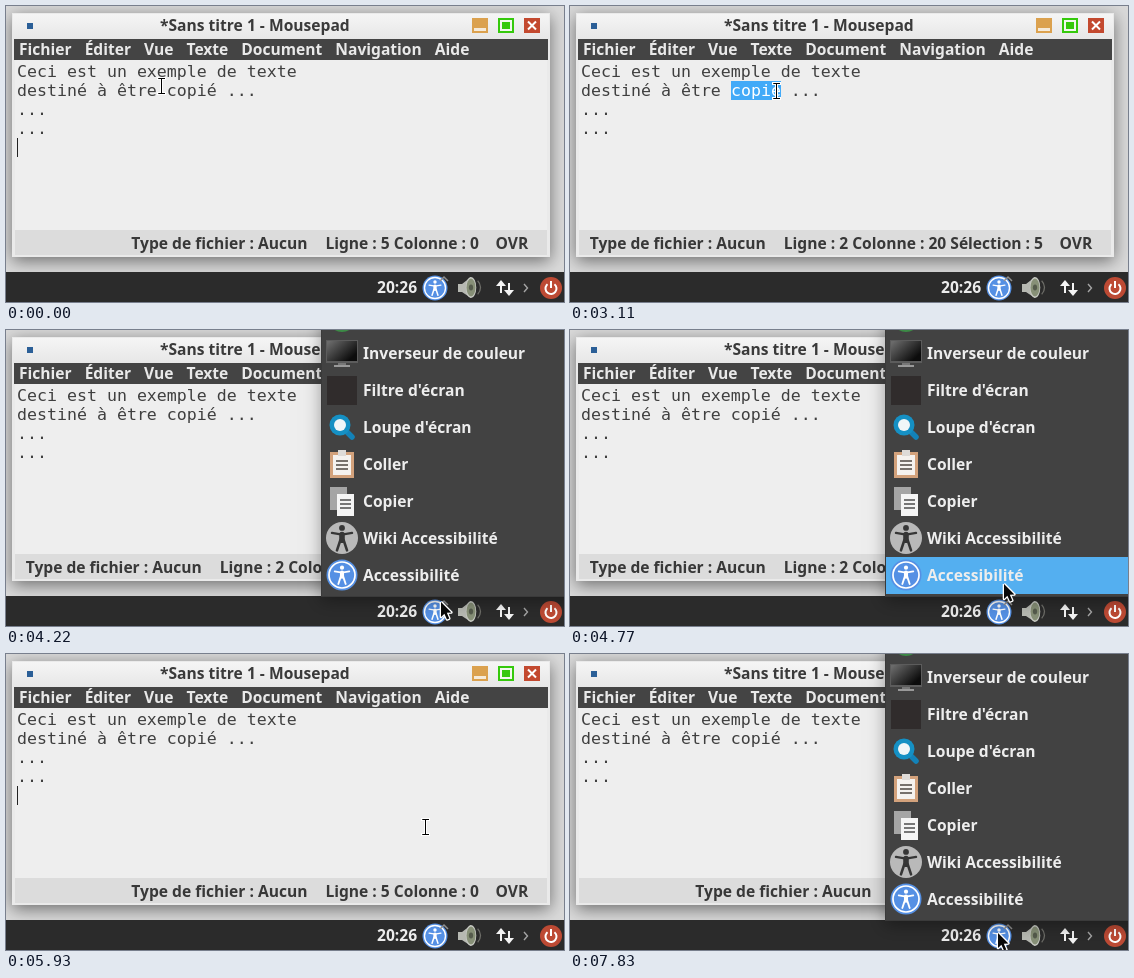
Write an HTML page with a canvas that moves like this. It is 558 px wide and 296 px high and loops after 8000 ms.

```html
<!DOCTYPE html>
<html lang="fr">
<head>
<meta charset="utf-8">
<title>Copier un texte</title>
<style>
html, body { margin: 0; width: 100%; height: 100%; overflow: hidden; background: #d8d8d8; }
canvas { display: block; width: 558px; height: 296px; }
</style>
</head>
<body>
<canvas id="stage" width="558" height="296"></canvas>
<script>
const ctx = document.getElementById('stage').getContext('2d');
const LOOP = 8000, STEP = 40;
const UI = 'bold 15.6px "Noto Sans", "Open Sans", sans-serif';
const MONO = '16.6px "DejaVu Sans Mono", monospace';

// Moments of the story, in ms
const PRESS = 2440, SELECT = 2570, OPEN = 4220, CLOSE = 5510, FOCUS = 5630,
  CLICK = 5810, LEAVE = 7730, REOPEN = 7830;

// Pointer moves: start, duration, goal; it rests between them
const HOME = [155.5, 80];
const MOVES = [
  [1720, 200, 185.5, 80], [2090, 120, 189.5, 81], [3070, 40, 206.5, 85],
  [3190, 440, 434, 276], [4180, 40, 434, 271], [4440, 40, 434, 266],
  [4610, 680, 428, 172], [CLICK, 460, 376, 178],
  [6950, 200, 400, 247], [7150, 580, 427, 278]
];
const MENU_BAR = ['Fichier', 'Éditer', 'Vue', 'Texte', 'Document', 'Navigation', 'Aide'];
const ITEMS = ['Inverseur de couleur', "Filtre d'écran", "Loupe d'écran", 'Coller',
  'Copier', 'Wiki Accessibilité', 'Accessibilité'];
const LINES = ['Ceci est un exemple de texte', 'destiné à être copié ...', '...', '...'];

const within = (t, a, b) => t >= a && t < b;
const blink = age => (age + 1200) % 1200 < 800;
const smooth = p => p * p * (3 - 2 * p);

function pointerAt(t) {
  let [x, y] = HOME;
  for (const [start, span, goalX, goalY] of MOVES) {
    if (t < start) break;
    const p = smooth(Math.min(1, Math.floor((t - start) / STEP) * STEP / span));
    x += (goalX - x) * p;
    y += (goalY - y) * p;
  }
  return [x, y];
}

function rect(x, y, w, h, color) {
  ctx.fillStyle = color;
  ctx.fillRect(x, y, w, h);
}
function disc(x, y, r, color, squash = 1) {
  ctx.fillStyle = color;
  ctx.beginPath();
  ctx.ellipse(x, y, r * squash, r, 0, 0, 7);
  ctx.fill();
}
function trace(points) {
  ctx.beginPath();
  points.forEach(([x, y]) => ctx.lineTo(x, y));
}
function poly(points, color) {
  trace(points);
  ctx.fillStyle = color;
  ctx.fill();
}
function line(points, color, width) {
  trace(points);
  ctx.strokeStyle = color;
  ctx.lineWidth = width;
  ctx.stroke();
}
function arc(x, y, r, a, b, color, width) {
  ctx.beginPath();
  ctx.arc(x, y, r, a, b);
  ctx.strokeStyle = color;
  ctx.lineWidth = width;
  ctx.stroke();
}
// Draws text and returns its width
function text(s, x, y, color, font = UI, align = 'left') {
  ctx.font = font;
  ctx.textAlign = align;
  ctx.fillStyle = color;
  ctx.fillText(s, x, y);
  return ctx.measureText(s).width;
}
function at(x, y, scale, draw) {
  ctx.save();
  ctx.translate(x, y);
  ctx.scale(scale, scale);
  draw();
  ctx.restore();
}
function shadowed(alpha, x, y, w, h, color) {
  ctx.save();
  ctx.shadowColor = `rgba(0,0,0,${alpha})`;
  ctx.shadowBlur = 16;
  ctx.shadowOffsetY = 4;
  rect(x, y, w, h, color);
  ctx.restore();
}
function gradient(x0, y0, x1, y1, from, to) {
  const g = ctx.createLinearGradient(x0, y0, x1, y1);
  g.addColorStop(0, from);
  g.addColorStop(1, to);
  return g;
}
function stripes(x, y, w, color) {
  for (let i = 0; i < 3; i++) rect(x, y + 4 * i, w, 2, color);
}

function person(x, y, scale, color) {
  at(x, y, scale, () => {
    ctx.lineCap = 'round';
    disc(0, -9, 2.6, color);
    line([[-9, -4.5], [0, -3], [9, -4.5]], color, 2);
    line([[0, -3], [0, 2]], color, 5);
    for (const side of [-1, 1]) line([[side * 1.5, 2], [side * 4.5, 11]], color, 2.3);
  });
}
function accessBadge(x, y, r) {
  disc(x, y, r, '#5590e4');
  arc(x, y, r * 0.84, 0, 7, '#fff', r * 0.11);
  person(x, y, r / 19, '#fff');
}

// One icon per menu entry, centred on the origin
const ICONS = [
  () => {
    rect(-4, 9, 8, 4, '#777');
    rect(-8, 12, 16, 2, '#999');
    rect(-16, -13, 32, 23, '#5c5c5c');
    rect(-15, -12, 30, 20, gradient(-12, -12, 6, 8, '#6a6a6a', '#0c0c0c'));
  },
  () => rect(-15, -14, 30, 29, '#302c2c'),
  () => {
    ctx.lineCap = 'round';
    line([[4, 4], [10, 10]], '#1382b8', 5.5);
    disc(-2, -2, 10.5, '#1590c4');
    disc(-2, -2, 6, '#f0f6f8');
  },
  () => {
    rect(-12, -12, 24, 26, '#d3a27c');
    rect(-9, -9, 18, 20, '#f5f2ef');
    rect(-4, -14, 8, 6, '#dedbd8');
    stripes(-6, -4, 12, '#77716c');
  },
  () => {
    rect(-12, -14, 17, 23, '#a5a5a5');
    rect(-5, -7, 17, 22, '#f5f5f5');
    stripes(-2, -2, 11, '#777');
  },
  () => {
    disc(0, 0, 16, '#b9b9b9');
    person(0, 0, 1.12, '#363636');
  },
  () => accessBadge(0, 0, 15.5)
];

function statusAt(t) {
  if (within(t, PRESS, SELECT)) return 'Ligne : 2 Colonne : 18';
  if (within(t, SELECT, CLICK)) return 'Ligne : 2 Colonne : 20 Sélection : 5';
  return 'Ligne : 5 Colonne : 0';
}

function drawButtons() {
  ['#dba14e', '#35c90c', '#c3492f'].forEach((c, i) => rect(466 + 26 * i, 12, 16, 15, c));
  rect(468, 22, 12, 3, '#f5ead9');
  ctx.lineCap = 'butt';
  ctx.strokeStyle = '#f2f8ef';
  ctx.lineWidth = 2;
  ctx.strokeRect(495, 15, 10, 9);
  for (const s of [-4, 4]) line([[526 - s, 15.5], [526 + s, 23.5]], '#fff', 2);
}

function drawText(t) {
  rect(9, 54, 532, 170, '#eee');
  LINES.forEach((s, i) => text(s, 11, 71 + 19 * i, '#3f3f3f', MONO));
  if (within(t, SELECT, OPEN) || within(t, FOCUS, CLICK)) {
    rect(161, 75, 50, 19, '#42aaf8');
    text('copié', 161, 90, '#fff', MONO);
  }
  const typing = t < PRESS && blink(t - 680);
  const clicked = within(t, CLICK, LEAVE) && blink(t - CLICK + 20);
  if (typing || clicked) rect(11, 132, 1, 19, '#222');
  if (within(t, PRESS, SELECT)) rect(191, 75, 1, 19, '#222');
}

function drawWindow(t) {
  rect(0, 0, 558, 296, '#dadada');
  shadowed(0.5, 6, 7, 538, 244, '#eaeaea');
  rect(7, 8, 536, 25, gradient(0, 8, 0, 33, '#f5f5f5', '#e7e7e7'));
  rect(21, 17, 6, 6, '#2b5f97');
  text('*Sans titre 1 - Mousepad', 154, 25, '#3a3a3a');
  drawButtons();

  rect(8, 33, 534, 21, '#444');
  let x = 13;
  for (const s of MENU_BAR) x += text(s, x, 49, '#e9e9e9') + 13;
  drawText(t);

  rect(9, 224, 532, 25, '#dcdcdc');
  const w = text(statusAt(t), 473, 243, '#383838', UI, 'right');
  text('Type de fichier : Aucun', 455 - w, 243, '#383838', UI, 'right');
  text('OVR', 489.5, 243, '#383838');
}

function drawPanel() {
  rect(0, 266, 558, 30, '#2b2b2b');
  text('20:26', 371, 287, '#ececec');
  accessBadge(429, 282, 12.5);
  line([[434, 275], [438, 271], [442, 275]], '#909090', 1.5);

  poly([[452, 278], [456, 278], [465, 271], [465, 292], [456, 286], [452, 286]], '#b7b9b2');
  disc(465, 281.5, 10.5, '#c9cbc5', 0.5);
  disc(465, 281.5, 9, '#879077', 0.5);
  disc(465, 281.5, 3, '#555b4c', 0.7);
  arc(465, 281.5, 9.5, -0.8, 0.8, '#6d6d68', 1.3);

  for (const s of [-1, 1]) at(499 + 4 * s, 282, 1, () => {
    ctx.scale(1, s);
    poly([[-5, 2], [0, 8], [5, 2]], '#f4f4f4');
    rect(-1, -5, 2, 8, '#f4f4f4');
  });
  line([[518, 278], [521.5, 282], [518, 286]], '#a5a5a5', 1.4);

  disc(545, 282, 11, '#bd4a34');
  arc(545, 282.5, 5.5, -0.9, Math.PI + 0.9, '#fff', 2);
  rect(544, 275, 2, 7, '#fff');
}

function drawMenu(y) {
  shadowed(0.35, 315, -20, 270, 287, '#3a3a3a');
  rect(316, 0, 242, 266, '#424242');
  disc(336, -12, 14, '#3c8b46');
  ITEMS.forEach((s, i) => {
    const top = 5 + 37 * i;
    if (within(y, top, top + 37)) rect(316, top, 242, 37, '#54aff0');
    at(336, top + 18, 1, ICONS[i]);
    text(s, 357, top + 24, '#ededed');
  });
}

function drawBeam() {
  ctx.lineCap = 'square';
  for (const [color, width] of [['#fff', 3], ['#000', 1]]) {
    line([[0, -7.5], [0, 7.5]], color, width);
    for (const y of [-7.5, 7.5]) line([[-3, y], [3, y]], color, width);
  }
}
function outlined(shape) {
  ctx.lineJoin = 'round';
  line([...shape, shape[0]], '#fff', 2.6);
  poly(shape, '#080808');
}
function drawArrow() {
  outlined([[1, 1], [1, 16], [4.4, 12.8], [7, 18.5], [9.3, 17.5], [6.8, 11.8], [11.4, 11.4]]);
}
function drawResize() {
  rect(-8, 1, 16, 4, '#fff');
  outlined([[-1, -12], [1, -12], [1, -5], [6, -5], [0, 1], [-6, -5], [-1, -5]]);
  rect(-7, 2, 14, 2, '#080808');
}

function drawPointer(x, y, menu) {
  if (!menu && y < 224) at(Math.floor(x) + 0.5, Math.round(y), 1, drawBeam);
  else at(Math.round(x), Math.round(y), 1, !menu && within(y, 240, 253) ? drawResize : drawArrow);
}

function draw(t) {
  const [x, y] = pointerAt(t);
  const menu = within(t, OPEN, CLOSE) || t >= REOPEN;
  drawWindow(t);
  drawPanel();
  if (menu) drawMenu(y);
  drawPointer(x, y, menu);
}

const start = performance.now();
function tick() {
  draw((performance.now() - start) % LOOP);
  requestAnimationFrame(tick);
}
tick();
</script>
</body>
</html>
```
